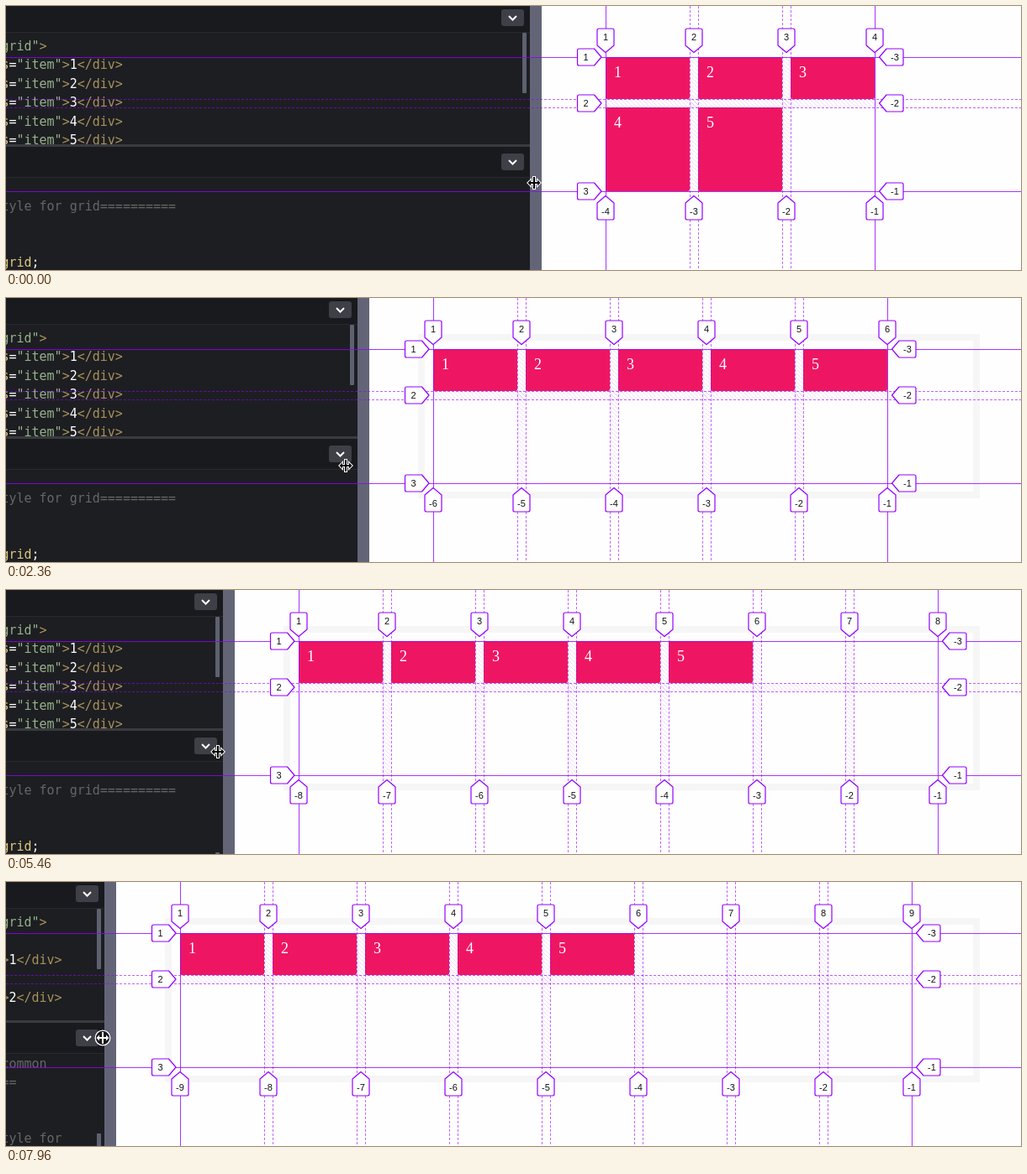
Recreate the animation shown at these times as an HTML page. Size 1207 by 315 pixels, loop 8 s.

```html
<!DOCTYPE html>
<html lang="en">
<head>
<meta charset="utf-8">
<title>Resizing a grid</title>
<style>
  html, body { margin: 0; width: 100%; height: 100%; overflow: hidden; background: #fefefe; }
  svg { display: block; }
  .code { font: 15px "DejaVu Sans Mono", monospace; white-space: pre; }
  .item { font: 18px "Liberation Serif", serif; fill: #fff; }
  .tag { font: 11px "Liberation Sans", sans-serif; fill: #111; text-anchor: middle; }
  .badge { fill: #fff; stroke: #9400ff; stroke-width: 1.2; stroke-linejoin: round; }
  .edge { stroke: #9400ff; stroke-opacity: .8; }
  .gap { stroke: #9400ff; stroke-opacity: .6; stroke-dasharray: 3 2; }
</style>
</head>
<body>
<svg width="1207" height="315" viewBox="0 0 1207 315">
  <defs>
    <pattern id="hatch" width="5" height="5" patternUnits="userSpaceOnUse">
      <path d="M-1 -1L6 6M-1 4L1 6M4 -1L6 1" stroke="#9400ff" stroke-opacity=".16" stroke-width=".8"/>
    </pattern>
    <clipPath id="pane"><rect id="paneBox" height="315"/></clipPath>
    <clipPath id="markup"><rect y="32" width="1207" height="134"/></clipPath>
  </defs>
  <g id="scene"></g>
</svg>
<script>
const W = 1207, H = 315, LOOP = 8000, STEP = 147.4;
const CELL = 100, GAP = 10, PITCH = CELL + GAP, RIGHT = 1140;
const COLOR = { s: '#96b38a', t: '#a7925a', k: '#ddca7e', w: '#fff', c: '#666' };

// Key points of the drag: [step, left edge of the divider]
const DRAG = [
  [0, 623], [1, 620], [3, 603], [8, 535], [16, 418], [17, 396], [22, 332], [24, 319],
  [26, 320], [31, 320], [32, 317], [35, 291], [36, 271], [38, 244], [42, 173],
  [44, 153], [47, 156], [50, 156], [54, 117]
];

const scene = document.getElementById('scene');
const paneBox = document.getElementById('paneBox');

// Runs on past the last key at the same speed
function divider(step) {
  let i = 0;
  while (i < DRAG.length - 2 && DRAG[i + 1][0] <= step) i++;
  const [s0, x0] = DRAG[i], [s1, x1] = DRAG[i + 1];
  return Math.round(x0 + (x1 - x0) * (step - s0) / (s1 - s0));
}

const rect = (x, y, w, h, fill, r = 0) =>
  `<rect x="${x}" y="${y}" width="${w}" height="${h}" rx="${r}" fill="${fill}"/>`;
const line = (cls, x1, y1, x2, y2) =>
  `<line class="${cls}" x1="${x1}" y1="${y1}" x2="${x2}" y2="${y2}"/>`;
const vline = (cls, x) => line(cls, x + .5, 0, x + .5, H);
const hline = (cls, y) => line(cls, 0, y + .5, W, y + .5);
const esc = s => String(s).replace(/</g, '&lt;').replace(/>/g, '&gt;');

// parts: pairs of colour key and text
function code(y, ...parts) {
  let out = '';
  for (let i = 0; i < parts.length; i += 2)
    out += `<tspan fill="${COLOR[parts[i]]}">${esc(parts[i + 1])}</tspan>`;
  return `<text class="code" x="-5.6" y="${y}">${out}</text>`;
}

function button(d, y) {
  return rect(d - 34, y - 10, 27, 20, '#3e3f47', 3) +
    `<path d="M${d - 25} ${y - 2}l4.5 4.5l4.5 -4.5" fill="none" stroke="#fff" stroke-width="2"/>`;
}

function markup(d) {
  const row = i => 53 + 22.4 * i;
  const wrapped = d < 147;
  let out = code(row(0), 's', 'grid"', 't', '>');
  for (let n = 1; n <= (wrapped ? 2 : 5); n++) {
    const tail = ['t', '>', 'w', n, 't', '</div>'];
    out += wrapped
      ? code(row(n * 2), ...tail)
      : code(row(n), 'k', 's', 'w', '=', 's', '"item"', ...tail);
  }
  return out;
}

function styles(d) {
  const row = i => 221.5 + 22.4 * i;
  return d < 211
    ? code(row(0), 'c', 'common') + code(row(1), 'c', '==') + code(row(4), 'c', 'tyle for')
    : code(row(1), 'c', 'tyle for grid==========') + code(row(4), 'k', 'grid', 'w', ';');
}

function header(d, y, h) {
  return rect(0, y, d, h, '#191a1d') + rect(0, y + h, d, 1, '#292a2e');
}

function editor(d) {
  const thumbY = d < 160 ? 300 : 313;
  return `<g clip-path="url(#pane)">` +
    rect(0, 0, d, H, '#1d1e22') + header(d, 0, 31) +
    `<g clip-path="url(#markup)">${markup(d)}</g>` +
    rect(d - 9, 32, 5, 72, '#5d6170', 1) +
    rect(0, 165, d, 3, '#3b3b3f') + header(d, 168, 36) + styles(d) +
    (d < 321 ? rect(d - 9, thumbY, 5, 40, '#5d6170', 1) : '') +
    button(d, 14) + button(d, 186) + '</g>' +
    rect(d, 0, 14, H, '#636577');
}

function border(x, step) {
  if (step < 1 || (step >= 39 && step < 43)) return '';
  return `<rect x="${x - 14}" y="47" width="${RIGHT + 28 - x}" height="188"
    fill="none" stroke="#f6f6f6" stroke-width="8"/>`;
}

// A badge whose tip is at x, y; the body lies in the direction dx, dy
function badge(x, y, dx, dy, label) {
  const turn = Math.atan2(dy, dx) * 180 / Math.PI;
  return `<path class="badge" transform="translate(${x} ${y}) rotate(${turn})"
    d="M0 0L8.5 -10H26.5Q28.5 -10 28.5 -8V8Q28.5 10 26.5 10H8.5Z"/>` +
    `<text class="tag" x="${x + dx * 18.5}" y="${y + dy * 18.5 + 3.8}">${label}</text>`;
}

function grid(x, cols) {
  const width = cols * PITCH - GAP;
  let cells = '', lines = '', badges = '';
  for (let i = 0; i < 5; i++) {
    const left = x + (i % cols) * PITCH, second = i >= cols;
    const top = second ? 121 : 61;
    cells += rect(left, top, CELL, second ? 100 : 50, '#ee1662', 2) +
      `<text class="item" x="${left + 10}" y="${top + 24}">${i + 1}</text>`;
  }
  cells += rect(x, 111, width, GAP, 'url(#hatch)');
  for (let i = 0; i <= cols; i++) {
    const mid = i === 0 ? x : i === cols ? x + width : x + i * PITCH - GAP / 2;
    if (i === 0 || i === cols) lines += vline('edge', mid);
    else {
      cells += rect(mid - 5, 61, GAP, 160, 'url(#hatch)');
      lines += vline('gap', mid - 5) + vline('gap', mid + 5);
    }
    badges += badge(mid, 55.5, 0, -1, i + 1) + badge(mid, 226.5, 0, 1, i - cols - 1);
  }
  lines += hline('edge', 61) + hline('gap', 111) + hline('gap', 121) + hline('edge', 221);
  [61, 116, 221].forEach((y, i) => {
    badges += badge(x - 5, y, -1, 0, i + 1) + badge(x + width + 5.5, y, 1, 0, i - 3);
  });
  return cells + lines + badges;
}

// The divider trails the pointer by one step
function pointer(step) {
  const x = divider(step + 1) + 8, y = Math.round(181 + .0475 * x);
  const ringed = step >= 39;
  const ring = ringed
    ? '<circle r="8.8" fill="#17181b" stroke="#fff" stroke-width="1.3"/>' : '';
  const paint = ringed
    ? 'fill="#fff"' : 'fill="#000" stroke="#fff" stroke-width="2" paint-order="stroke"';
  return `<g transform="translate(${x} ${y})">${ring}<path ${paint}
    d="M-1 -7H1V-1H4V-3.5L7.5 0L4 3.5V1H1V7H-1V1H-4V3.5L-7.5 0L-4 -3.5V-1H-1Z"/></g>`;
}

function draw(step) {
  const d = divider(step), x = d + 90;
  const cols = Math.floor((RIGHT - x + GAP) / PITCH);
  paneBox.setAttribute('width', d);
  scene.innerHTML = rect(0, 0, W, H, '#fefefe') + border(x, step) + editor(d) +
    grid(x, cols) + pointer(step);
}

let shown = -1;
function tick() {
  const step = Math.floor((performance.now() % LOOP + 5) / STEP);
  if (step !== shown) draw(shown = step);
  requestAnimationFrame(tick);
}
tick();
</script>
</body>
</html>
```
